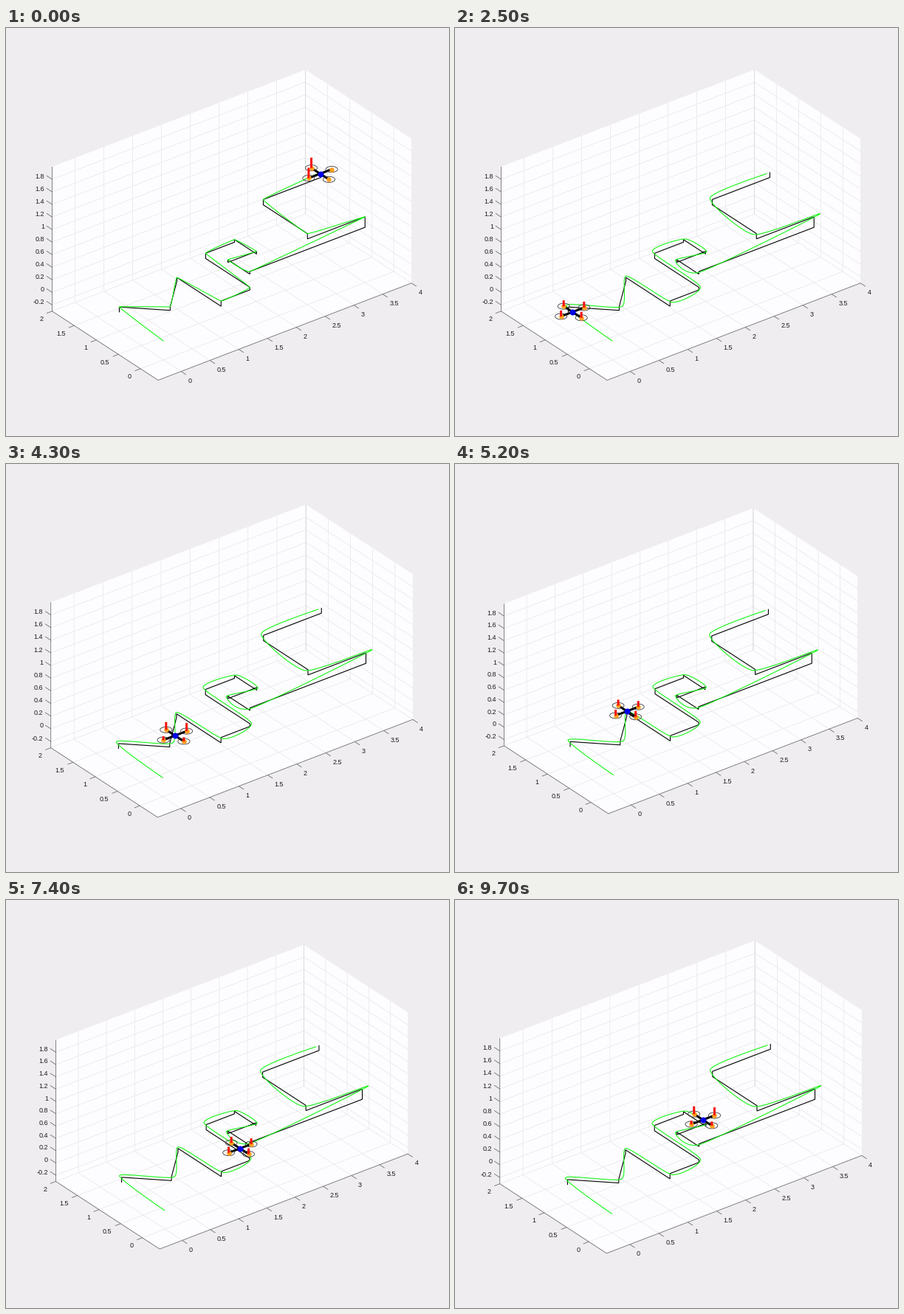
Write a matplotlib script that moves like this. It is 600 px wide and 553 px high and loops after 9800 ms.

```python
import numpy as np
import matplotlib.pyplot as plt
from matplotlib.animation import FuncAnimation
from matplotlib.collections import LineCollection
from matplotlib.patches import Polygon

W, H, DPI = 600, 553, 64
STEP, FRAMES = 100, 98
PT = 72 / DPI                     # points per pixel
CENTRE = np.array([305.5, 266])   # the zoom keeps this point still
EDGE = 62                         # left edge of the box at zoom 1
XMIN, XMAX, YMIN, YMAX, ZMIN, ZMAX = -0.4, 4, -0.4, 2, -0.3, 2

# Orthographic view: azimuth -37.5, elevation 30
SCALE, AZ, EL = 98.3, np.radians(37.5), np.radians(30)
EX = SCALE * np.array([np.cos(AZ), -np.sin(AZ) * np.sin(EL)])
EY = SCALE * np.array([-np.sin(AZ), -np.cos(AZ) * np.sin(EL)])
EZ = SCALE * np.array([0, -np.cos(EL)])
ORIGIN = np.array([212.8, 423.8])
UX, UY = EX / np.hypot(*EX), EY / np.hypot(*EY)

# Waypoints on the floor; the height grows with the distance flown
WAY = np.array([(0, 0), (0, 1), (.5, .5), (1, 1), (1, 0), (1.5, 0), (1.5, 1), (2, 1),
                (2, .5), (1.5, .5), (1.5, 0), (3.5, 0), (2.5, 0), (2.5, 1), (3.5, 1)])
FLOWN = np.r_[0, np.cumsum(np.hypot(*np.diff(WAY, axis=0).T))]
RISE = FLOWN / FLOWN[-1]

# Key poses: time, distance flown, left edge of the box, tilt along x and y
START = 1100
KEYS = np.array([(START, 0, 60, 0, 0), (2500, .84, 62, 0, 0), (4300, 1.89, 60.3, 1, 1),
                 (5200, 2.41, 66, 0, 0), (6500, 3.48, 67, -1, 1),
                 (8400, 4.91, 67, 1, -1), (9700, 5.8, 60.3, 1, 1)])


def flat(x, y, z):
    return ORIGIN + x * EX + y * EY + z * EZ


def zoomed(pts, s):
    return (np.asarray(pts) - CENTRE) * s + CENTRE


def staircase():
    """Level legs with a climb at each waypoint."""
    return [flat(*WAY[i], z) for i in range(1, len(WAY)) for z in RISE[i - 1:i + 1]]


def trail(push, bend):
    """Smooth path that overshoots each corner by a share of the leg before it.

    Returns progress in legs and the points."""
    way = np.array([flat(*p, z) for p, z in zip(WAY, RISE)])
    over = push * np.diff(way, axis=0)
    over[-1] *= -1
    p = way + np.vstack([np.zeros(2), over])
    m = np.zeros_like(p)
    m[1:-1] = bend * (p[2:] - p[:-2])
    t = np.linspace(0, 1, 30)[:, None]
    legs, pts = [], []
    for i in range(len(p) - 1):
        q = (p[i] + (p[i + 1] - p[i]) * t * t * (3 - 2 * t)
             + m[i] * t * (1 - t) ** 2 - m[i + 1] * t * t * (1 - t))
        run = np.r_[0, np.cumsum(np.hypot(*np.diff(q, axis=0).T))]
        legs.append(i + run / run[-1])
        pts.append(q)
    return np.concatenate(legs), np.vstack(pts)


PLAN = staircase()
_, TIGHT = trail(0, .08)
LEGS, LOOSE = trail(.05, .3)


def lifts(hover, tx, ty):
    """Thrust bars of the motors at +y, +x, -x and -y."""
    return hover + np.array([ty, tx, -tx, -ty])


def state(t):
    """Zoom, drone place, thrust and trail at time t."""
    if t < START:
        return 1, np.array([425, 197]), lifts(7, -7, 7), TIGHT
    dist, edge, tx, ty = (np.interp(t, KEYS[:, 0], col) for col in KEYS[:, 1:].T)
    leg = np.interp(dist, FLOWN, np.arange(len(FLOWN)))
    pos = np.array([np.interp(leg, LEGS, c) for c in LOOSE.T])
    zoom = (CENTRE[0] - edge) / (CENTRE[0] - EDGE)
    return zoom, pos, lifts(8, 3 * tx, 2.5 * ty), LOOSE


XT = np.arange(0, 4.1, .5)
YT = np.arange(0, 2.1, .5)
ZT = np.arange(-.2, 1.9, .2)


def grid_lines():
    out = []
    for x in XT:
        out.append([flat(x, YMIN, ZMIN), flat(x, YMAX, ZMIN)])
        out.append([flat(x, YMAX, ZMIN), flat(x, YMAX, ZMAX)])
    for y in YT:
        out.append([flat(XMIN, y, ZMIN), flat(XMAX, y, ZMIN)])
        out.append([flat(XMAX, y, ZMIN), flat(XMAX, y, ZMAX)])
    for z in ZT:
        out.append([flat(XMIN, YMAX, z), flat(XMAX, YMAX, z)])
        out.append([flat(XMAX, YMAX, z), flat(XMAX, YMIN, z)])
    return out


GRID = grid_lines()
FRAME = [flat(XMIN, YMAX, ZMAX), flat(XMIN, YMAX, ZMIN), flat(XMIN, YMIN, ZMIN),
         flat(XMAX, YMIN, ZMIN)]
BACK = [flat(XMAX, YMAX, ZMIN), flat(XMAX, YMAX, ZMAX)]
HULL = FRAME + [flat(XMAX, YMIN, ZMAX), BACK[1]]

# Each tick: place, direction, value, label shift, alignment
TICKS = ([(flat(x, YMIN, ZMIN), -UY * 8, x, (9.2, 11.7), 'left') for x in XT]
         + [(flat(XMIN, y, ZMIN), -UX * 8, y, (-12, 10), 'right') for y in YT]
         + [(flat(XMIN, YMAX, z), UY * 9, z, (-10.5, -5), 'right') for z in ZT])

fig = plt.figure(figsize=(W / DPI, H / DPI), dpi=DPI, facecolor='#efedf0')
ax = fig.add_axes([0, 0, 1, 1])


def line(pts, color, width, order):
    ax.plot(*np.asarray(pts).T, color=color, lw=width * PT, zorder=order,
            solid_capstyle='butt', solid_joinstyle='miter', snap=False)


def segments(pts, color, width, order):
    ax.add_collection(LineCollection(pts, colors=color, linewidths=width * PT,
                                     zorder=order, snap=False))


def dot(p, size, color, order):
    ax.plot(*p, 'o', ms=size * PT, color=color, mew=0, zorder=order, snap=False)


def draw_box(s):
    ax.add_patch(Polygon(zoomed(HULL, s), fc='#fdfcfe', ec='none', zorder=0))
    segments(zoomed(GRID, s), '#e9e8ea', .8, 1)
    line(zoomed(BACK, s), '#dad9db', .9, 2)
    line(zoomed(FRAME, s), '#6a6a6a', .8, 3)
    marks = []
    for at, way, value, shift, side in TICKS:
        p = zoomed(at, s)
        marks.append([p, p + way])
        ax.text(*(p + shift), f'{round(value, 1) + 0:g}', ha=side, va='center_baseline',
                color='#1c1c1c', family='Liberation Sans', fontsize=9 * PT, zorder=3)
    segments(marks, '#6a6a6a', .8, 3)


def draw_drone(pos, lift, s):
    arms = .2 * s * np.array([EY, EX, -EX, -EY])
    hubs = pos + arms
    line([hubs[0], hubs[3]], 'black', 3, 6)
    line([hubs[1], hubs[2]], 'black', 3, 6)
    turn = np.linspace(0, 2 * np.pi, 40)
    rim = .082 * s * (np.outer(np.cos(turn), EX) + np.outer(np.sin(turn), EY))
    for hub, up in zip(hubs, lift):
        line(hub + rim, '#333333', .8, 7)
        dot(hub, 6.5, '#ffa01e', 8)
        line([hub, hub - (0, up)], '#f5100a', 3, 9)
    dot(pos, 8, '#0000e6', 10)


def update(i):
    s, pos, lift, path = state(i * STEP)
    ax.clear()
    ax.set(xlim=(-.5, W - .5), ylim=(H - .5, -.5))
    ax.axis('off')
    draw_box(s)
    line(zoomed(PLAN, s), 'black', 1.1, 4)
    line(zoomed(path, s), '#14f514', 1.1, 5)
    draw_drone(zoomed(pos, s), lift, s)
    return []


anim = FuncAnimation(fig, update, frames=FRAMES, interval=STEP, init_func=lambda: [],
                     repeat=True, repeat_delay=0)
plt.show()
```
